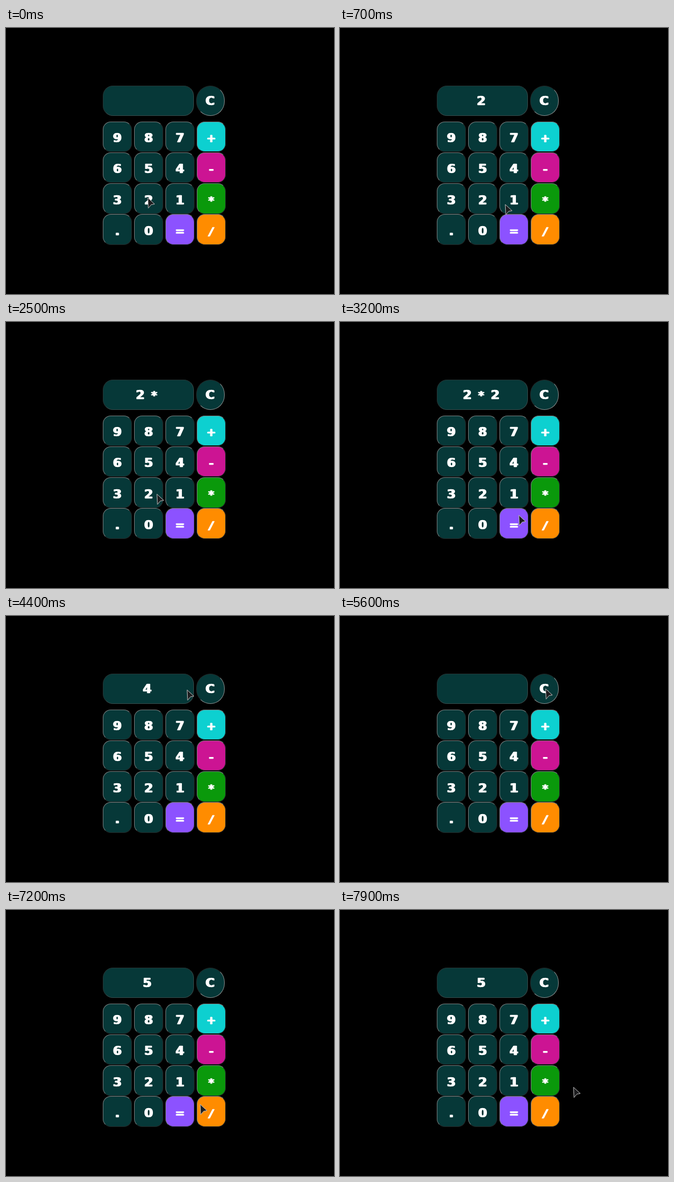
An HTML page for the animation above (8000 ms loop, 576x466 px).

```html
<!DOCTYPE html>
<html lang="en">
<head>
<meta charset="utf-8">
<title>Calculator</title>
<style>
html, body { margin: 0; width: 100%; height: 100%; overflow: hidden; background: #000; }
body { position: relative; }
.box {
  position: absolute; box-sizing: border-box;
  background: #063838; color: #fff;
  border: 1.5px solid; border-color: #737b7b #222828 #222828 #737b7b;
  border-radius: 14px;
  font: bold 22px "DejaVu Sans", sans-serif;
  -webkit-text-stroke: .4px #fff;
  text-shadow: .9px 0 #fff, -.9px 0 #fff;
}
.box span { position: absolute; transform: translate(-50%, -50%); line-height: 1; }
.op { font-size: 20px; }
.slash { font-style: oblique; }
#screen { border-color: #243535 #344848 #344848 #243535; border-radius: 18px; }
#clear { border-color: #222828 #858b8b #858b8b #222828; border-radius: 25px; }
#cursor { position: absolute; left: 0; top: 0; overflow: visible; }
</style>
</head>
<body>
<script>
const LOOP = 8000, STEP = 100, GLIDE = 500;
const KEYS = ['987+', '654-', '321*', '.0=/'];
const TINTS = { '+': '#0dd0d0', '-': '#cc1493', '*': '#0a990b', '=': '#8c52ff', '/': '#ff8c00' };
const OPS = {
  '+': (a, b) => a + b,
  '-': (a, b) => a - b,
  '*': (a, b) => a * b,
  '/': (a, b) => a / b
};

const PRESSES = { 400: '2', 2100: '*', 2800: '2', 3800: '=', 5600: 'C', 6800: '5' };

// The cursor rests at each stop, then glides to arrive at the next on time
const STOPS = [
  { at: 0, x: 248, y: 297 },
  { at: 1000, x: 365, y: 330 },
  { at: 1900, x: 360, y: 301 },
  { at: 2500, x: 264, y: 301 },
  { at: 3200, x: 313, y: 338 },
  { at: 4400, x: 317, y: 129 },
  { at: 4700, x: 410, y: 142 },
  { at: 4900, x: 360, y: 127 },
  { at: 6200, x: 249, y: 283 },
  { at: 6700, x: 251, y: 250 },
  { at: 7200, x: 340, y: 340 },
  { at: 7900, x: 409, y: 310 }
];

function addBox(x, y, w, h, id = '') {
  const el = document.createElement('div');
  el.className = 'box';
  el.id = id;
  el.style.cssText = `left:${x}px;top:${y}px;width:${w}px;height:${h}px`;
  document.body.append(el);
  return el;
}

function addText(box, text, x, y) {
  const el = document.createElement('span');
  el.textContent = text;
  if (OPS[text] || text === '=') el.className = 'op';
  if (text === '/') el.classList.add('slash');
  el.style.left = x + 'px';
  el.style.top = y + 'px';
  box.append(el);
}

const screen = addBox(170, 101, 160, 52.5, 'screen');
addText(addBox(333.5, 101, 50, 52.5, 'clear'), 'C', 24, 25.5);

KEYS.forEach((row, r) => [...row].forEach((key, c) => {
  const box = addBox(170 + c * 55, 163.5 + r * 54.3, 51, 53.5);
  if (TINTS[key]) box.style.background = TINTS[key];
  addText(box, key, 24.5, 28.5);
}));

document.body.insertAdjacentHTML('beforeend',
  `<svg id="cursor" width="14" height="20"><path d="M1 .5L13 11.5L7 12.5L2 18.5Z"
  fill="#1d1d1f" stroke="#bcbcbc" stroke-linejoin="round"/></svg>`);
const cursor = document.getElementById('cursor');

const mix = (a, b, k) => a + (b - a) * k;
const ease = u => u * u * (3 - 2 * u);

function cursorAt(t) {
  const i = STOPS.findLastIndex(s => s.at <= t);
  const from = STOPS[i], to = STOPS[i + 1] || from;
  const span = Math.min(GLIDE, to.at - from.at) || 1;
  const k = ease(Math.max(0, 1 - Math.max(0, to.at - t) / span));
  return [mix(from.x, to.x, k), mix(from.y, to.y, k)];
}

function press(tokens, key) {
  if (key === 'C') return [];
  if (key !== '=') return [...tokens, key];
  const [a, op, b] = tokens;
  return [String(OPS[op](+a, +b))];
}

function tokensAt(t) {
  return Object.keys(PRESSES)
    .filter(at => at <= t)
    .reduce((tokens, at) => press(tokens, PRESSES[at]), []);
}

function showTokens(tokens) {
  screen.replaceChildren();
  tokens.forEach((text, i) =>
    addText(screen, text, 77 + (i - (tokens.length - 1) / 2) * 24.5, 25.5));
}

let last = -1;
function frame(now) {
  const t = Math.floor(now % LOOP / STEP) * STEP;
  if (t !== last) {
    last = t;
    const [x, y] = cursorAt(t);
    cursor.style.transform = `translate(${x}px, ${y}px)`;
    showTokens(tokensAt(t));
  }
  requestAnimationFrame(frame);
}
frame(0);
</script>
</body>
</html>
```
